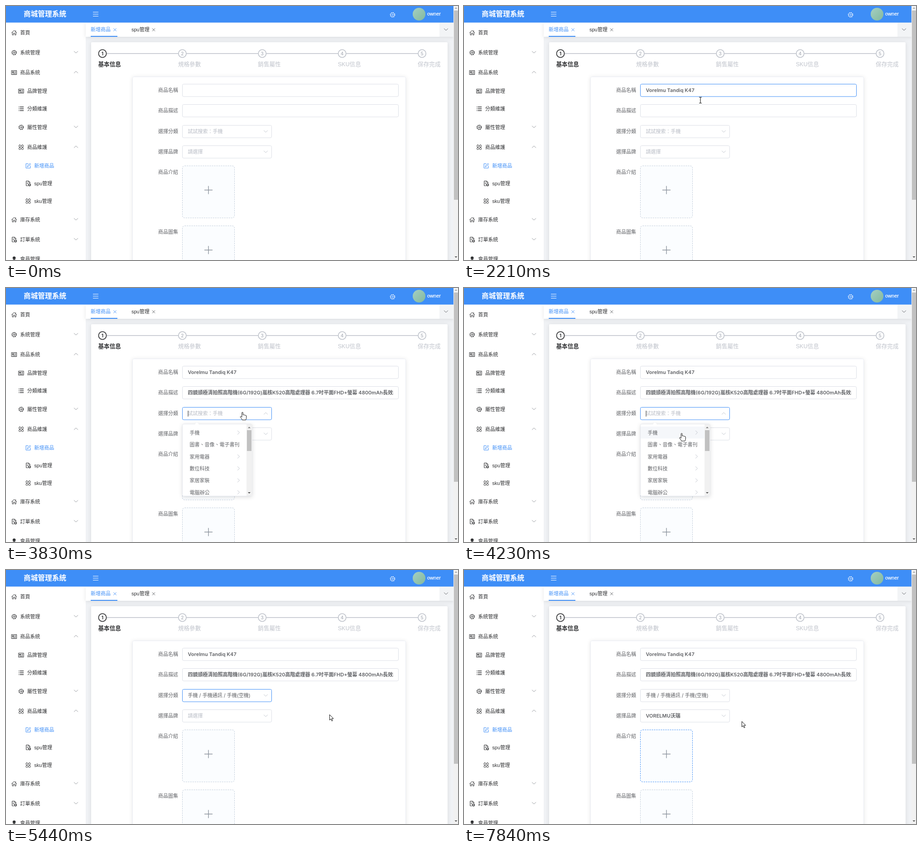
An HTML page for the animation above (8000 ms loop, 998 by 561 pixels).

```html
<!DOCTYPE html>
<html lang="zh-Hant">
<head>
<meta charset="utf-8">
<title>新增商品</title>
<style>
html, body { margin: 0; width: 100%; height: 100%; overflow: hidden; background: #fff; }
svg { display: block; width: 998px; height: 561px; }
text { font: 11px "Liberation Sans", "Noto Sans CJK TC", "Noto Sans CJK", sans-serif; fill: #303133; }
text.label, text.item { fill: #606266; }
text.value { font-family: Inter, "Noto Sans CJK TC", "Noto Sans CJK", sans-serif; font-weight: 600; fill: #606266; }
text.plain { font-weight: 400; }
text.hint { fill: #b8bcc5; }
text.blue { fill: #3e8ef7; }
text.path { fill: #3e8ef7; font-weight: 700; }
text.title { font-size: 15.7px; font-weight: 700; fill: #fff; }
text.white { fill: #fff; stroke: #fff; stroke-width: .25px; }
text.step { font-size: 12.6px; fill: #c0c4cc; }
text.num { font: 600 10px Inter, sans-serif; fill: #b4b8c0; text-anchor: middle; }
text.on { fill: #303133; font-weight: 700; }
text.end { text-anchor: end; }
.line { fill: none; stroke: currentColor; stroke-linecap: round; stroke-linejoin: round; }
.pop { filter: drop-shadow(0 2px 4px rgba(0,0,0,.13)); }
.card { filter: drop-shadow(0 1px 4px rgba(0,0,0,.1)); }
</style>
</head>
<body>
<svg id="stage" viewBox="0 0 998 561">
  <defs>
    <linearGradient id="face" x2="1" y2="1">
      <stop stop-color="#a5cfc2"/><stop offset="1" stop-color="#83b99e"/>
    </linearGradient>
    <clipPath id="inner"><rect x="400" y="217" width="455" height="29"/></clipPath>
    <clipPath id="list"><rect x="390" y="301" width="406" height="158"/></clipPath>
    <g id="home" class="line"><path d="M-5.5 0 0-5 5.5 0M-4-1V5H-1.5V1H1.5V5H4V-1M3.3-4.8V-2.4"/></g>
    <g id="gear" class="line">
      <circle r="4.4"/><circle r="1.7"/>
      <circle r="5.2" stroke-width="1.2" stroke-dasharray="2.04" stroke-linecap="butt"/>
    </g>
    <g id="idcard" class="line">
      <path d="M-5.5-4.5H5.5V4.5H-5.5ZM1-2H3.5M1 0H3.5M-3.5 2.5H3.5"/>
      <path d="M-3.5-2H-1V0H-3.5Z" fill="currentColor"/>
    </g>
    <g id="rows" class="line" stroke-width="1.6"><path d="M-2.5-4H5M-2.5 0H5M-2.5 4H5M-5-4h.1M-5 0h.1M-5 4h.1"/></g>
    <g id="grid" class="line">
      <rect x="-5" y="-5" width="4.2" height="4.2" rx="1.5"/><rect x=".8" y="-5" width="4.2" height="4.2" rx="1.5"/>
      <rect x="-5" y=".8" width="4.2" height="4.2" rx="1.5"/><rect x=".8" y=".8" width="4.2" height="4.2" rx="1.5"/>
    </g>
    <g id="edit" class="line"><path d="M0-4.8H-5V5H4.8V0M-2 2l.5-2.3L4-5.3 5.5-3.8 0 1.5Z"/></g>
    <g id="doc" class="line">
      <path d="M-.5 5H-4.5V-5.5H1L4-2.5V-1M1-5.5V-2.5H4M-2.5-2H-1M-2.5.5H-.5"/>
      <circle cx="3" cy="3" r="2.2" stroke-width="1.5"/>
    </g>
    <g id="user" fill="currentColor"><circle cy="-2.5" r="3.3"/><path d="M-5.5 6Q-5 1 0 1T5.5 6Z"/></g>
    <path id="cross" class="line" d="M-2.8-2.8 2.8 2.8M2.8-2.8-2.8 2.8"/>
    <path id="down" class="line" d="M-4-2 0 2 4-2"/>
    <path id="up" class="line" d="M-4 2 0-2 4 2"/>
    <path id="next" class="line" d="M-2-4 2 0-2 4"/>
    <path id="plus" class="line" d="M-8.5 0H8.5M0-8.5V8.5"/>
    <path id="arrow" d="M.5.5V12.5L3.3 9.9 5.3 14.6 7.2 13.8 5.2 9.2H9Z" fill="#fff" stroke="#111"/>
    <path id="ibeam" d="M-3-6.5H-1Q0-6.5 0-5.5 0-6.5 1-6.5H3M0-5.5V5.5M-3 6.5H-1Q0 6.5 0 5.5 0 6.5 1 6.5H3" fill="none" stroke="#222" stroke-width="1.2"/>
    <path id="hand" d="M-1.2 1.2Q0-.8 1.3 1.2V6.3Q2.6 5 3.8 6.7 5.2 5.6 6.3 7.3 8.6 6.6 8.7 9V12.5Q8.6 14.5 7.4 17.5H-.3Q-1.2 14.8-4.4 11.4C-5.5 9.8-3.4 8.6-1.2 11Z" fill="#fff" stroke="#111" stroke-linejoin="round"/>
  </defs>
  <g id="page"></g>
  <g id="live"></g>
</svg>
<script>
const LOOP = 8000, BLUE = '#3e8ef7', INK = '#303133', PALE = '#c0c4cc', EDGE = '#dcdfe6';
const $ = id => document.getElementById(id);
const text = (x, y, s, cls = '', more = '') => `<text x="${x}" y="${y}" class="${cls}" ${more}>${s}</text>`;
const rect = (x, y, w, h, fill, more = '') => `<rect x="${x}" y="${y}" width="${w}" height="${h}" fill="${fill}" ${more}/>`;
const icon = (id, x, y, color = INK, more = '') =>
  `<use href="#${id}" transform="translate(${x} ${y})" color="${color}" ${more}/>`;
const tri = (x, y, d, fill) => `<path d="M${x - 3} ${y + d}h6l-3 ${-3 * d}z" fill="${fill}"/>`;

// icon, x, y, label, chevron
const menu = [
  ['home', 18, 59, '首頁'], ['gear', 18, 103, '系統管理', 'down'], ['idcard', 18, 147, '商品系統', 'up'],
  ['idcard', 33.5, 188, '品牌管理'], ['rows', 33.5, 227, '分類維護'], ['gear', 33.5, 268, '屬性管理', 'down'],
  ['grid', 33.5, 312, '商品維護', 'up'], ['edit', 49, 353, '新增商品'], ['doc', 49, 392, 'spu管理'],
  ['grid', 49, 431, 'sku管理'], ['home', 18, 472, '庫存系統', 'down'], ['doc', 18, 516, '訂單系統', 'down'],
  ['user', 18, 559, '會員管理']
];
const steps = ['基本信息', '規格參數', '銷售屬性', 'SKU信息', '保存完成'];
const labels = [['商品名稱', 186], ['商品描述', 231], ['選擇分類', 277], ['選擇品牌', 322], ['商品介紹', 367], ['商品圖集', 499]];
const kinds = [
  ['手機', '圖書、音像、電子書刊', '家用電器', '數位科技', '家居家裝', '電腦辦公'],
  ['手機通訊', '運營商', '手機配件'],
  ['手機(空機)', '對講機']
];
const brands = ['zelpu', '禾嵐', 'VORELMU沃瑞'];
const NAME = 'Vorelmu Tandiq K47';
const DESC = '四鏡頭極清拍照高階機(6G/192G)嵐核K520高階處理器 6.7吋平面FHD+螢幕 4800mAh長效續航';

function page() {
  let s = rect(0, 0, 998, 561, '#fff') + rect(176, 37, 812, 524, '#f0f2f5');
  s += rect(188, 80, 787, 500, '#fff', 'class="card" rx="2"');
  s += rect(279.5, 156.5, 603, 430, '#fff', 'class="card" rx="3" stroke="#ebeef5"');

  s += rect(176, 37, 812, 31, '#fff', 'class="card"') + rect(957, 37, 31, 31, '#f2f4f6');
  s += text(187, 56, '新增商品', 'blue') + icon('cross', 240.5, 52.5, BLUE) + rect(187, 66, 59, 2, BLUE);
  s += text(277, 56, 'spu管理') + icon('cross', 326, 52.5, '#606266') + icon('down', 971.5, 52, '#606266');

  s += rect(0, 0, 988, 36.6, BLUE) + text(39, 23, '商城管理系統', 'title');
  s += '<path d="M192 13.5h12M192 18h12M192 22.5h12" stroke="#fff"/>';
  s += icon('gear', 853.5, 19.5, '#fff', 'stroke-width=".8"');
  s += '<circle cx="912" cy="18" r="14" fill="url(#face)"/>' + text(930, 21, 'owner', 'white');

  for (const [id, x, y, label, chevron] of menu) {
    const on = id === 'edit';
    s += icon(id, x, y, on ? BLUE : INK) + text(x + 13.3, y + 4, label, on ? 'blue' : '');
    if (chevron) s += icon(chevron, 154.5, y - 1, '#909399');
  }

  steps.forEach((label, i) => {
    const x = 213 + i * 176.4, color = i ? PALE : INK;
    if (i < 4) s += rect(x + 9, 104.2, 158.4, 1.6, PALE);
    s += `<circle cx="${x}" cy="105" r="8.6" fill="#fff" stroke="${color}" stroke-width="1.7"/>`;
    s += text(x, 108.7, i + 1, i ? 'num' : 'num on') + text(x - 9.5, 133, label, i ? 'step' : 'step on');
  });
  for (const [label, y] of labels) s += text(380, y + 4, label, 'label end');

  s += rect(988, 0, 10, 561, '#f1f1f1') + rect(989, 10, 9, 418, '#c1c1c1');
  return s + tri(993.5, 5, 1, '#a3a3a3') + tri(993.5, 554, -1, '#505050');
}

const box = (y, w, on) => rect(389.5, y + .5, w, 27.5, '#fff', `rx="3" stroke="${on ? BLUE : EDGE}"`);
const caret = y => rect(401.5, y - 6, 1, 13, '#333');
const upload = (y, on) =>
  rect(389.5, y, 115, 115, '#fbfdff', `rx="5" stroke="${on ? BLUE : '#c0ccda'}" stroke-dasharray="3 2"`) +
  icon('plus', 447, y + 53.5, '#8c939d', 'stroke-width="1.4"');
const popup = (y, w, h) => '<g class="pop">' + rect(389.5, y + .5, w, h, '#fff', 'rx="3" stroke="#e4e7ed"') +
  `<path d="M417 ${y + 1}l4.5-4.5 4.5 4.5z" fill="#fff"/></g>`;

function pick(y, on, open, value, hint, cls = '') {
  return box(y, 197, on) + text(401.5, y + 18, value || hint, value ? 'value ' + cls : 'hint') +
    icon(open ? 'up' : 'down', 573.5, y + 14, PALE) + (open ? caret(y + 14) : '');
}

function cascade(depth, hover) {
  const lefts = [390, 544, 670], widths = [141, 126, 126];
  let s = popup(300, [154, 280, 406][depth - 1], 159) + '<g clip-path="url(#list)">';
  for (let c = 0; c < depth; c++) {
    const x = lefts[c];
    if (c) s += rect(x, 301, 1, 158, '#e4e7ed');
    kinds[c].forEach((label, i) => {
      const y = 319.3 + i * 26.4, path = i === 0 && c < depth - 1;
      if (i === 0 && (path || c === hover)) s += rect(x, y - 13.3, widths[c], 26.4, '#f5f7fa');
      s += text(x + 15.5, y + 4.4, label, path ? 'path' : 'item');
      if (c < 2 && !(c === 0 && i === 1)) s += icon('next', x + widths[c] - 17.5, y, PALE);
    });
  }
  s += rect(531, 301, 12.5, 158, '#f1f1f1') + rect(532, 314, 10, 46, '#c1c1c1');
  return s + tri(537, 308.5, 1, '#777') + tri(537, 452, -1, '#505050') + '</g>';
}

function brandList(hover) {
  let s = popup(346, 197, 89);
  brands.forEach((label, i) => {
    const y = 364 + i * 26.4;
    if (i === hover) s += rect(390, y - 13.2, 197, 26.4, '#f5f7fa');
    s += text(405.5, y + 4.2, label, 'item');
  });
  return s;
}

function live(v) {
  let s = box(172, 477, v.focus === 'name') + box(217, 477, v.focus === 'desc');
  if (v.name) s += text(401.5, 190, NAME, 'value');
  else if (v.focus === 'name') s += caret(187);
  if (v.desc) s += text(401.5, 235, DESC, 'value', 'clip-path="url(#inner)"');
  else if (v.focus === 'desc') s += caret(232);
  s += upload(353, v.lit) + upload(485.5);
  s += pick(263, v.focus === 'kind', v.depth, v.kind && '手機 / 手機通訊 / 手機(空機)', '試試搜索：手機', 'plain');
  s += pick(308, v.focus === 'brand', v.open, v.brand && brands[2], '請選擇');
  if (v.depth) s += cascade(v.depth, v.hover);
  if (v.open) s += brandList(v.hover);
  if (v.cur) s += icon(...v.cur);
  return s;
}

// time and what changes then; everything else carries over
const script = [
  [0, {}],
  [200, { cur: ['arrow', 568, 380] }],
  [400, { cur: ['arrow', 564, 330] }],
  [600, { cur: ['arrow', 556, 274] }],
  [810, { cur: ['ibeam', 548, 232] }],
  [1010, { cur: ['ibeam', 512, 194], focus: 'name' }],
  [1410, { cur: null, name: 1 }],
  [2010, { cur: ['ibeam', 513, 195] }],
  [2210, { cur: ['ibeam', 522, 208] }],
  [2410, { cur: ['ibeam', 534, 224] }],
  [2610, { cur: ['ibeam', 540, 232] }],
  [2810, { focus: 'desc' }],
  [3010, { cur: ['ibeam', 541, 236] }],
  [3230, { cur: ['arrow', 538, 263] }],
  [3430, { desc: 1 }],
  [3630, { cur: ['hand', 522, 274] }],
  [3830, { focus: 'kind', depth: 1 }],
  [4030, { cur: ['hand', 500, 300] }],
  [4230, { cur: ['hand', 480.5, 320.5], hover: 0 }],
  [4430, { depth: 2 }],
  [4640, { cur: ['hand', 525, 321] }],
  [4840, { cur: ['hand', 592, 320], hover: 1 }],
  [5040, { depth: 3 }],
  [5240, { cur: ['hand', 714, 319], hover: 2 }],
  [5440, { cur: ['arrow', 714, 319], depth: 0, kind: 1 }],
  [5640, { cur: ['arrow', 652, 319] }],
  [5840, { cur: ['hand', 562, 317] }],
  [6040, { cur: ['hand', 510, 316], focus: 'brand', open: 1, hover: -1 }],
  [6240, { cur: ['hand', 496, 354], hover: 0 }],
  [6440, { cur: ['hand', 487.5, 385.5], hover: 1 }],
  [6640, { cur: ['hand', 480, 411], hover: 2 }],
  [6840, { open: 0, brand: 1 }],
  [7040, { lit: 1 }],
  [7240, { focus: '' }],
  [7440, { cur: ['hand', 496, 398] }],
  [7640, { cur: ['arrow', 558, 364] }],
  [7840, { cur: ['arrow', 613, 334] }]
];
const states = [];
script.reduce((prev, [, patch]) => {
  const next = { ...prev, ...patch };
  states.push(next);
  return next;
}, {});

$('page').innerHTML = page();
let shown = -1;
function frame() {
  const t = performance.now() % LOOP;
  let i = script.length - 1;
  while (script[i][0] > t) i--;
  if (i !== shown) $('live').innerHTML = live(states[shown = i]);
  requestAnimationFrame(frame);
}
frame();
</script>
</body>
</html>
```
